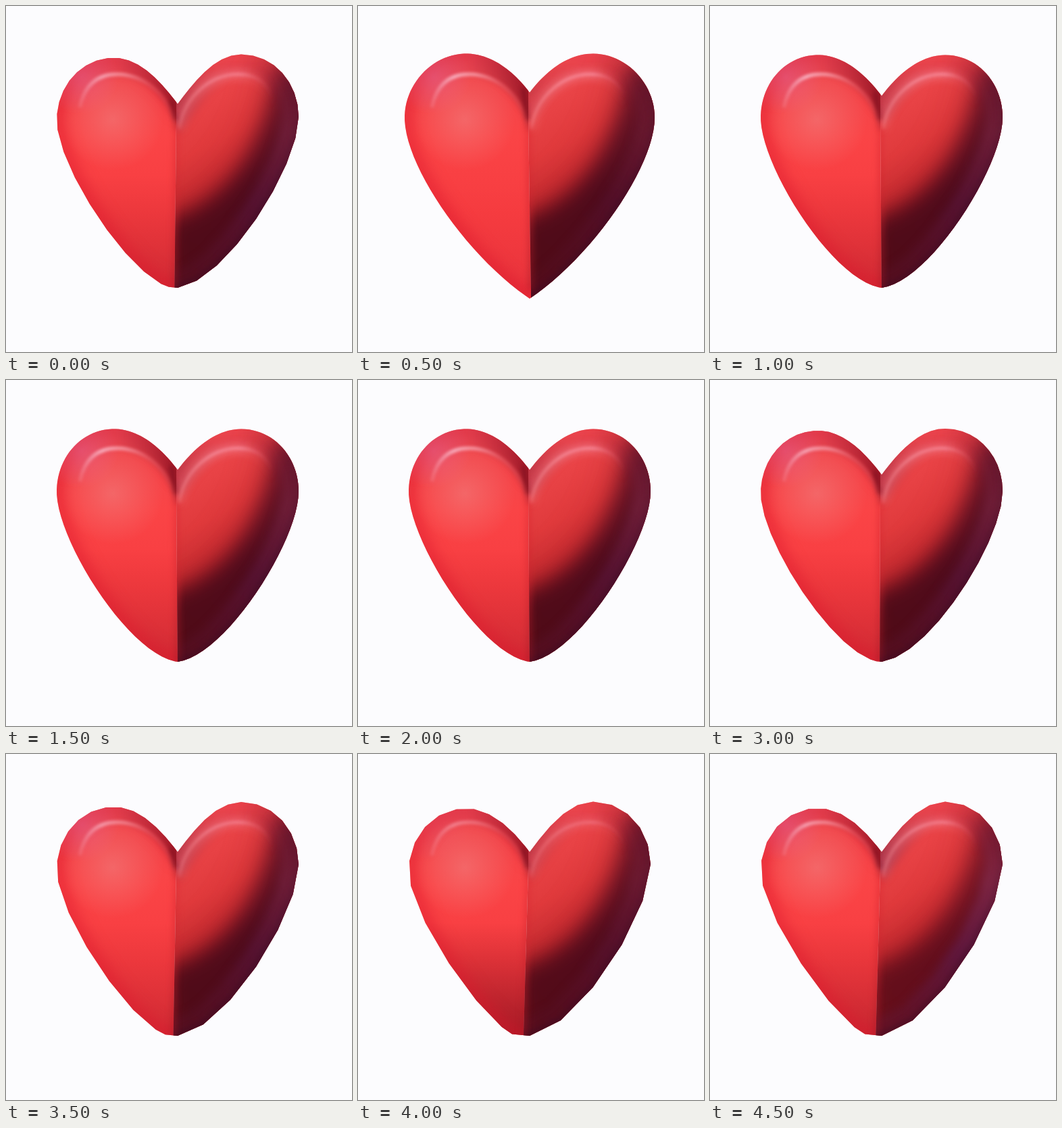
Animation, 512 px wide and 512 px high, one loop 5000 ms. Source, as an HTML page with a canvas:

```html
<!DOCTYPE html>
<html>
<head>
<meta charset="utf-8">
<style>
html, body { margin: 0; width: 100%; height: 100%; overflow: hidden; background: #fcfcfe; }
canvas { display: block; width: 100%; height: 100%; }
</style>
</head>
<body>
<canvas id="stage" width="512" height="512"></canvas>
<script>
const ctx = document.getElementById('stage').getContext('2d');
const MID = 254, SIZE = 512;

// wear: how far the mesh is reduced; grow: full size with a pointed tip.
function pose(wear, changes) {
  return {
    grow: 0, sink: 8 * wear, cut: 26 * wear,
    notch: 133 + 12 * Math.min(1, wear * 2),
    facets: Math.round(24 / (1 + 4 * wear)),
    arc: 0.7 - 0.2 * wear, rim: 0.45, low: 0.3, dark: 0.9, pink: 0.38,
    ...changes
  };
}

const smooth = pose(0);
const steps = [
  pose(0.5),
  pose(0, { grow: 1, rim: 0.25, low: 0.05, notch: 128 }),
  smooth, smooth, smooth, smooth,
  pose(0.3),
  pose(0.7),
  pose(1, { arc: 0.4, rim: 0.3, low: 0.75, dark: 0.87, pink: 0.1 }),
  pose(0.95, { arc: 0.6, rim: 0.7, low: 0.4, dark: 0.7 })
];

function cubic([a, b, c, d], t) {
  const s = 1 - t;
  return [0, 1].map(i =>
    s * s * s * a[i] + 3 * s * s * t * b[i] + 3 * s * t * t * c[i] + t * t * t * d[i]);
}

// One side of the outline, from the notch over the lobe to the tip.
function outline(p, side) {
  const left = side < 0, sink = left ? p.sink : -p.sink / 4;
  const cut = left ? p.cut : 0, wide = 179 + 6 * p.grow;
  const top = 72.5 - 2 * p.grow + sink, flank = 165 + sink;
  const at = (dx, y) => [MID + side * dx, y];
  const notch = at(0, p.notch), lobe = at(94, top), edge = at(wide, flank);
  const tip = at(cut, 417 + 16 * p.grow - cut * 0.1);
  const pull = at(71 + 20 * p.grow, 408 - 36 * p.grow - cut * 0.6);
  const curves = [
    [notch, at(21, p.notch - 28), at(54, top), lobe],
    [lobe, at(143, top), at(wide, 115 + sink), edge],
    [edge, at(wide, 238), pull, tip]
  ];
  const shift = left ? 0.5 : 0;
  const points = [notch];
  for (const c of curves) {
    for (let i = 1 - shift; i <= p.facets; i++) points.push(cubic(c, i / p.facets));
  }
  return [...points, tip];
}

function heart(p) {
  const path = new Path2D();
  const points = [...outline(p, -1), ...outline(p, 1).reverse()];
  points.forEach(([x, y]) => path.lineTo(x, y));
  path.closePath();
  return path;
}

// Inner edge of the bevel on a lobe.
function bevelEdge(side) {
  const path = new Path2D();
  const x = dx => MID + side * dx;
  path.moveTo(x(145), 150);
  path.bezierCurveTo(x(137), 113, x(116), 101, x(90), 101);
  path.bezierCurveTo(x(50), 101, x(10), 132, x(2), 182);
  return path;
}

function bevel(side) {
  const path = bevelEdge(side);
  path.lineTo(MID - side * 10, 182);
  path.lineTo(MID - side * 10, 0);
  path.lineTo(MID + side * 250, 0);
  path.lineTo(MID + side * 250, 150);
  return path;
}

function soft(blur, draw) {
  ctx.filter = `blur(${blur}px)`;
  draw();
  ctx.filter = 'none';
}

function softFill(path, blur, paint) {
  ctx.fillStyle = paint;
  soft(blur, () => ctx.fill(path));
}

function softLine(path, width, blur, paint) {
  ctx.strokeStyle = paint;
  ctx.lineWidth = width;
  soft(blur, () => ctx.stroke(path));
}

function flood(paint) {
  ctx.fillStyle = paint;
  ctx.fillRect(0, 0, SIZE, SIZE);
}

function ramp(x0, y0, x1, y1, ...colors) {
  const g = ctx.createLinearGradient(x0, y0, x1, y1);
  colors.forEach((c, i) => g.addColorStop(i / (colors.length - 1), c));
  return g;
}

function glow(x, y, r, rgb, alpha) {
  const g = ctx.createRadialGradient(x, y, 0, x, y, r);
  g.addColorStop(0, `rgba(${rgb},${alpha})`);
  g.addColorStop(0.5, `rgba(${rgb},${alpha * 0.5})`);
  g.addColorStop(1, `rgba(${rgb},0)`);
  flood(g);
}

function leftSide(p, shape) {
  flood(ramp(0, 80, 0, 420, '#ee464c', '#fa4446', '#f73c40', '#ee363e'));
  flood(ramp(0, 250, 0, 415, 'rgba(140,18,30,0)', `rgba(140,18,30,${p.low})`));
  softLine(shape, 22, 10, 'rgba(220,22,45,.5)');
  glow(158, 168, 75, '240,135,135', 0.5);
  softFill(bevel(-1), 5, ramp(75, 0, 252, 0,
    'rgba(222,65,85,0)', 'rgba(220,65,85,.5)', 'rgba(130,15,30,.75)'));
  glow(112, 105, 55, '225,110,170', p.pink);
  softLine(bevelEdge(-1), 5, 2, ramp(106, 0, 250, 0, 'rgba(255,220,235,.1)',
    `rgba(255,220,235,${p.arc})`, `rgba(255,205,220,${p.arc * 0.8})`,
    `rgba(255,140,150,${p.arc * 0.4})`, 'rgba(255,120,130,.1)'));
}

function rightSide(p, shape) {
  flood(ramp(270, 100, 370, 290, '#f04a4e', '#e03a3c', '#b8242a'));
  softFill(bevel(1), 5, ramp(255, 0, 430, 0,
    'rgba(225,65,75,.5)', 'rgba(230,62,75,.5)', 'rgba(160,30,48,.5)'));

  const shade = new Path2D('M235 318 C335 288 388 200 400 90 L500 90 V500 H235 Z');
  softFill(shade, 30, 'rgba(150,16,28,.6)');
  ctx.globalAlpha = p.dark;
  softFill(shade, 15, ramp(260, 400, 420, 110, '#480a16', '#460a1c', '#601428'));
  ctx.globalAlpha = 1;

  softLine(shape, 50, 7, ramp(0, 80, 0, 400, 'rgba(130,40,75,0)',
    `rgba(130,45,80,${p.rim})`, `rgba(95,28,75,${p.rim})`, `rgba(95,25,60,${p.rim * 0.5})`));
  softLine(shape, 10, 4, ramp(0, 90, 0, 300, 'rgba(60,10,35,0)', 'rgba(60,10,35,.5)'));

  const sheen = stop => ramp(253, 0, 395, 0, `rgba(255,160,165,${stop * 0.6})`,
    `rgba(255,170,185,${stop})`, `rgba(255,175,195,${stop})`, 'rgba(235,100,120,0)');
  softLine(bevelEdge(1), 14, 6, sheen(p.arc * 0.5));
  softLine(bevelEdge(1), 4, 2, sheen(p.arc * 0.7));
}

function half(side, ridge, draw) {
  const area = new Path2D();
  const outer = side < 0 ? 0 : SIZE;
  [[MID - 2, 0], [MID - 2, 170], [ridge, 420], [ridge, SIZE], [outer, SIZE], [outer, 0]]
    .forEach(([x, y]) => area.lineTo(x, y));
  ctx.save();
  ctx.clip(area);
  draw();
  ctx.restore();
}

function paint(p) {
  const shape = heart(p);
  const ridge = MID + 2 * p.grow - p.cut * 0.35;
  flood('#fcfcfe');
  ctx.save();
  ctx.clip(shape);
  half(-1, ridge, () => leftSide(p, shape));
  half(1, ridge, () => rightSide(p, shape));

  // Blend the ridge and darken the notch.
  softLine(new Path2D(`M252 175 L${ridge} 420`), 8, 4,
    ramp(0, 175, 0, 420, 'rgba(225,45,52,.6)', 'rgba(200,35,45,.5)', 'rgba(150,22,35,.4)'));
  softLine(new Path2D(`M244 ${p.notch - 6} L251 168`), 5, 3, 'rgba(105,8,25,.55)');
  ctx.restore();
}

let shown = -1;
const start = performance.now();

function tick() {
  const step = Math.floor((performance.now() - start) % 5000 / 500);
  if (step !== shown) {
    shown = step;
    paint(steps[step]);
  }
  requestAnimationFrame(tick);
}
tick();
</script>
</body>
</html>
```
